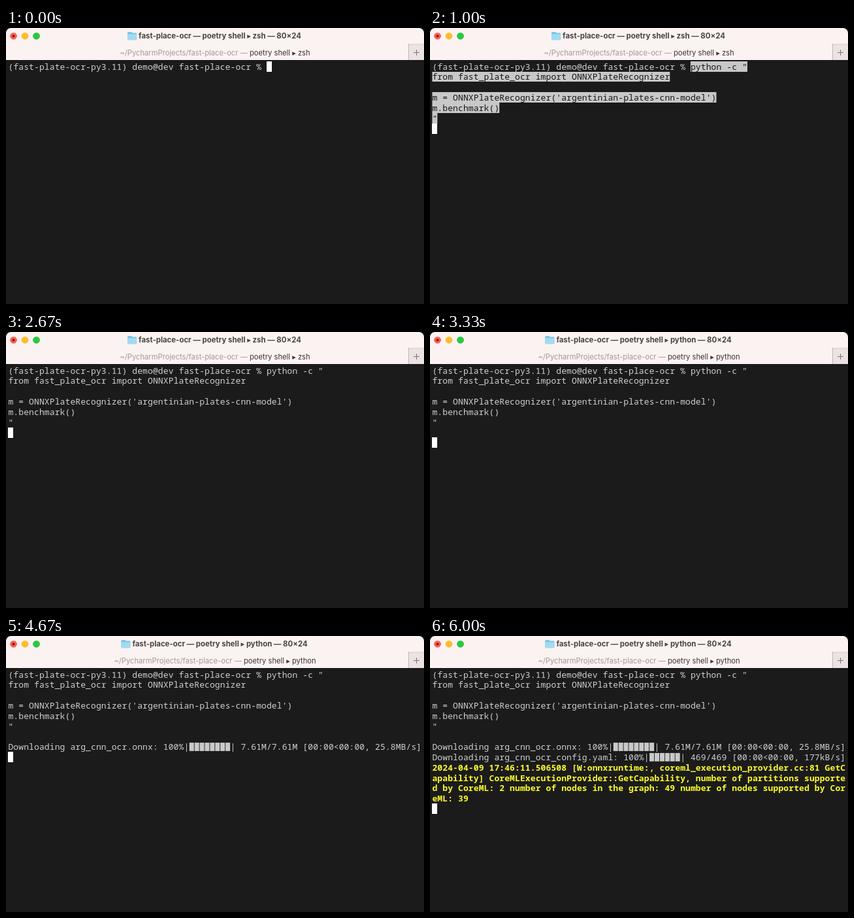
Write an HTML page with a canvas that moves like this. It is 640 px wide and 422 px high and loops after 8000 ms.

```html
<!DOCTYPE html>
<html lang="en">
<head>
<meta charset="utf-8">
<title>Terminal</title>
<style>
  html, body { margin: 0; width: 100%; height: 100%; overflow: hidden; background: #1b1b1b; }
  canvas { display: block; width: 640px; height: 422px; }
</style>
</head>
<body>
<canvas id="stage"></canvas>
<script>
const W = 640, H = 422, LOOP = 8000;
const CELL = 7.91, LINE = 15.8, LEFT = 3.4, TOP = 50.8;
const BACK = '#1b1b1b', TEXT = '#d0d0d0', YELLOW = '#fbfb2c';
const MONO = '"Noto Sans Mono", "DejaVu Sans Mono", monospace';
const SANS = 'Inter, "DejaVu Sans", sans-serif';

const canvas = document.getElementById('stage');
const ctx = canvas.getContext('2d');
const ratio = window.devicePixelRatio || 1;
canvas.width = W * ratio;
canvas.height = H * ratio;
ctx.scale(ratio, ratio);

const PROMPT = '(fast-plate-ocr-py3.11) demo@dev fast-place-ocr % ';
const COMMAND = [
  'python -c "',
  'from fast_plate_ocr import ONNXPlateRecognizer',
  '',
  "m = ONNXPlateRecognizer('argentinian-plates-cnn-model')",
  'm.benchmark()',
  '"'
];
const MODEL = 'Downloading arg_cnn_ocr.onnx: 100%|████████| 7.61M/7.61M [00:00<00:00, 25.8MB/s]';
const CONFIG = 'Downloading arg_cnn_ocr_config.yaml: 100%|██████| 469/469 [00:00<00:00, 177kB/s]';
const WARNING = '2024-04-09 17:46:11.506508 [W:onnxruntime:, coreml_execution_provider.cc:81 GetC' +
  'apability] CoreMLExecutionProvider::GetCapability, number of partitions supporte' +
  'd by CoreML: 2 number of nodes in the graph: 49 number of nodes supported by Cor' +
  'eML: 39';

const colX = col => LEFT + col * CELL;
const rowY = row => TOP + row * LINE;

function rect(x, y, w, h, color) {
  ctx.fillStyle = color;
  ctx.fillRect(x, y, w, h);
}

function disc(x, y, r, color) {
  ctx.fillStyle = color;
  ctx.beginPath();
  ctx.arc(x, y, r, 0, Math.PI * 2);
  ctx.fill();
}

function roundBox(x, y, w, h, radii, color) {
  ctx.fillStyle = color;
  ctx.beginPath();
  ctx.roundRect(x, y, w, h, radii);
  ctx.fill();
}

// Puts each character in its own terminal cell, wrapping at 80 columns.
function print(text, row, col = 0, color = TEXT, weight = 500) {
  ctx.font = `${weight} 13px ${MONO}`;
  ctx.textAlign = 'center';
  [...text].forEach((ch, i) => {
    const x = colX(col + i % 80), y = rowY(row + Math.floor(i / 80));
    if (ch === '█') {
      rect(x + 0.5, y + 1.7, CELL - 0.9, LINE - 3, '#c9c9c9');
    } else if (ch !== ' ') {
      ctx.fillStyle = color;
      ctx.fillText(ch, x + CELL / 2, y + 12.7);
    }
  });
}

function cursor(row, col = 0) {
  rect(Math.round(colX(col)), Math.round(rowY(row)), 8, 16, '#ffffff');
}

function folder(x, y) {
  roundBox(x, y, 7, 4, 1.2, '#6fbfe4');
  roundBox(x, y + 1.4, 14, 10.6, 1.2, '#75c3e6');
  roundBox(x, y + 3, 14, 9, 1.2, '#a3daf2');
}

function header(job) {
  rect(0, 0, W, 50, '#101010');
  roundBox(0, 0, W, 49, [8, 8, 0, 0], '#fbf3f1');

  ['#fe5f57', '#febc2e', '#28c840'].forEach((c, i) => disc(11.5 + i * 17.5, 12.3, 5.4, c));
  disc(11.5, 12.3, 1.9, '#7a0f0b');

  ctx.textAlign = 'left';
  ctx.font = `700 11.4px ${SANS}`;
  const title = `fast-place-ocr — poetry shell ▸ ${job} — 80×24`;
  const titleX = 327.5 - ctx.measureText(title).width / 2;
  ctx.fillStyle = '#484342';
  ctx.fillText(title, titleX, 16.3);
  folder(titleX - 17, 6.2);

  ctx.font = `400 11.2px ${SANS}`;
  const path = '~/PycharmProjects/fast-place-ocr — ';
  const task = `poetry shell ▸ ${job}`;
  const pathW = ctx.measureText(path).width;
  const tabX = 320 - (pathW + ctx.measureText(task).width) / 2;
  ctx.fillStyle = '#a09a98';
  ctx.fillText(path, tabX, 41.5);
  ctx.fillStyle = '#393534';
  ctx.fillText(task, tabX + pathW, 41.5);

  rect(616, 25, 24, 24, '#ebe3e1');
  rect(616, 24.5, 24, 0.8, '#cfc7c5');
  for (let y = 25; y < 49; y += 2) rect(616, y, 1, 1, '#8d8684');
  rect(624, 37, 9, 1, '#77716f');
  rect(628, 33, 1, 9, '#77716f');
}

function draw(t) {
  const pasted = t >= 330, selected = pasted && t < 2330;
  const running = t >= 3330, model = t >= 4330, done = t >= 5330;

  rect(0, 0, W, H, BACK);
  header(running ? 'python' : 'zsh');
  print(PROMPT, 0);

  if (pasted) {
    COMMAND.forEach((line, row) => {
      const col = row ? 0 : PROMPT.length;
      if (selected && line) {
        const y = Math.round(rowY(row));
        rect(colX(col), y, line.length * CELL, Math.round(rowY(row + 1)) - y, '#c8c8c8');
      }
      print(line, row, col, selected ? '#151515' : TEXT);
    });
  }
  if (model) print(MODEL, 7);
  if (done) {
    print(CONFIG, 8);
    print(WARNING, 9, 0, YELLOW, 700);
  }

  if (!pasted) cursor(0, PROMPT.length);
  else cursor(done ? 13 : model ? 8 : running ? 7 : 6);
}

const start = performance.now();
function tick() {
  draw((performance.now() - start) % LOOP);
  requestAnimationFrame(tick);
}
tick();
</script>
</body>
</html>
```
